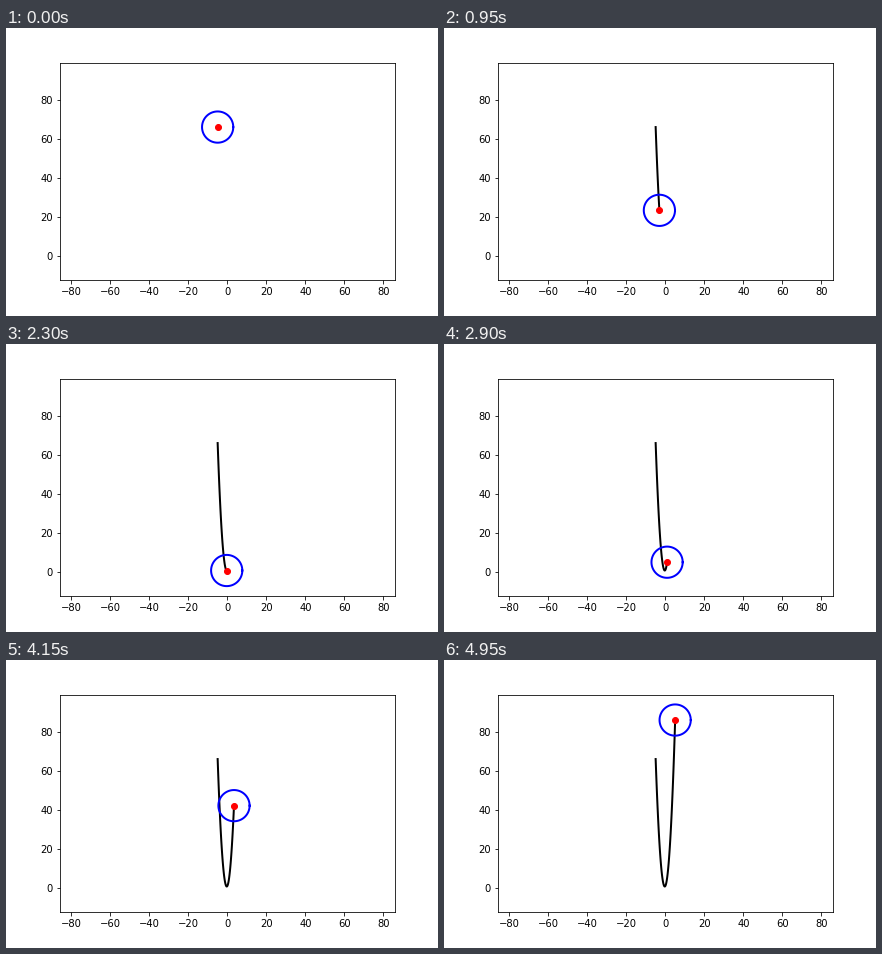
A matplotlib script for the animation above (5000 ms loop, 432 by 288 pixels).

```python
import matplotlib.pyplot as plt
import numpy as np
from matplotlib.animation import FuncAnimation

FRAMES = 100
RADIUS = 8

xs = np.linspace(-5, 5, FRAMES)
ys = 3 * xs**2 + 2 * xs + 1
angle = np.linspace(0, 2 * np.pi, 100)
ring_x, ring_y = RADIUS * np.cos(angle), RADIUS * np.sin(angle)

fig = plt.figure(figsize=(6, 4), dpi=72)
fig.subplots_adjust(left=0.125, right=0.9, bottom=0.125, top=0.88)
ax = fig.add_subplot()

# Fit the height to every ring position, then widen x for equal units.
low, high = ys.min() - RADIUS, ys.max() + RADIUS
margin = 0.05 * (high - low)
ax.set_ylim(low - margin, high + margin)
box = ax.get_window_extent()
half_width = (high - low + 2 * margin) * box.width / box.height / 2
ax.set_xlim(-half_width, half_width)

trail, = ax.plot([], [], "k", lw=2)
ring, = ax.plot([], [], "b", lw=2)
dot, = ax.plot([], [], "ro", ms=6)


def draw(i):
    x, y = xs[i], ys[i]
    trail.set_data(xs[:i + 1], ys[:i + 1])
    ring.set_data(x + ring_x, y + ring_y)
    dot.set_data([x], [y])
    return trail, ring, dot


anim = FuncAnimation(fig, draw, frames=FRAMES, interval=50, repeat=True)
plt.show()
```
